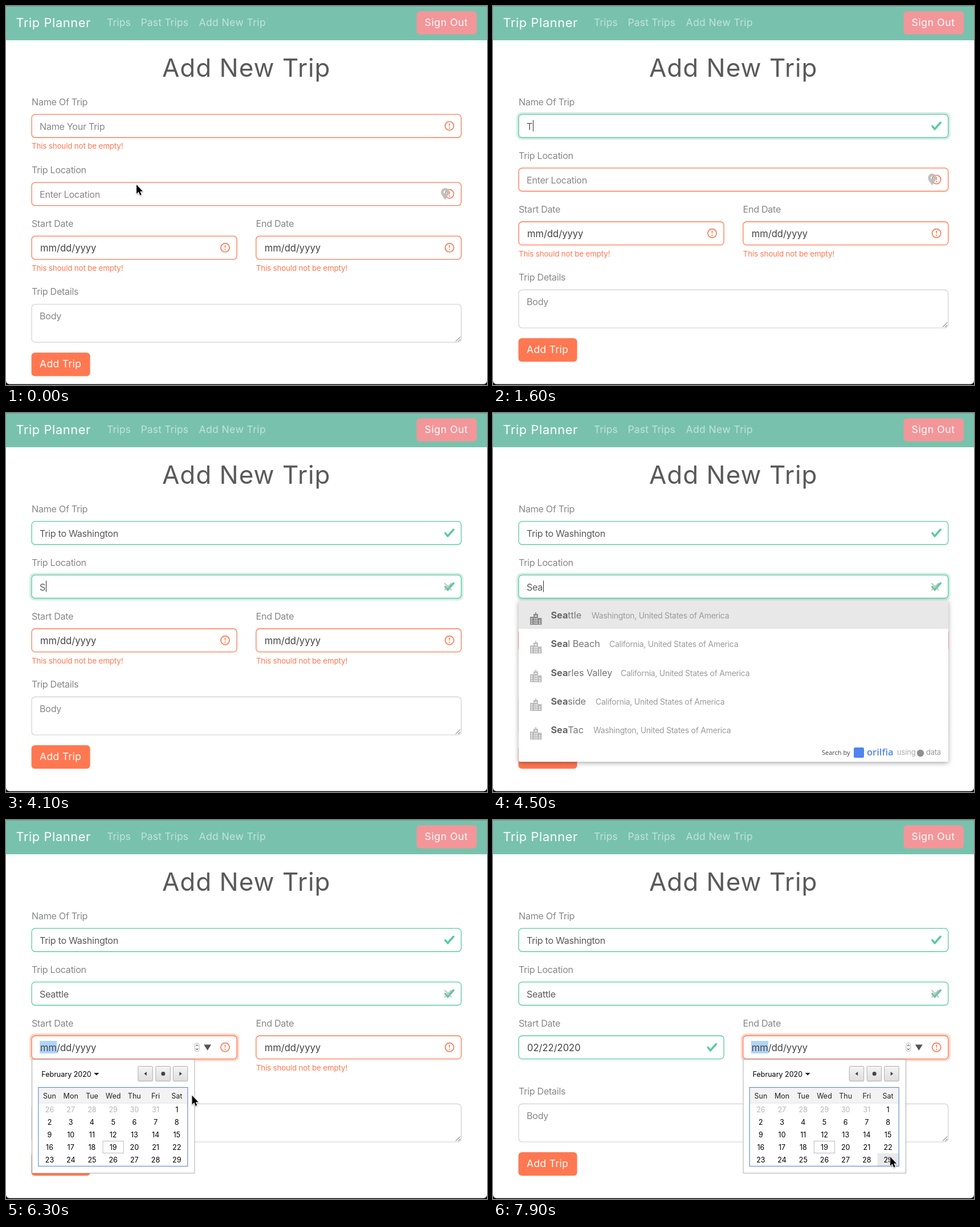
These frames come from a looping animation (844x664 px, 8000 ms). An HTML page with a canvas:

```html
<!DOCTYPE html>
<html lang="en">
<head>
<meta charset="utf-8">
<title>Add New Trip</title>
<style>
html, body { margin: 0; width: 100%; height: 100%; overflow: hidden; background: #fff; }
canvas { display: block; }
</style>
</head>
<body>
<canvas id="stage" width="844" height="664"></canvas>
<script>
const ctx = document.getElementById('stage').getContext('2d');
const LOOP = 8000, TICK = 100;
const GREEN = '#56cc9d', ORANGE = '#ff7851', MINT = '#78c2ad', GREY = '#888', INK = '#5a5a5a';
const UI = 'Inter, sans-serif';
const COL = 393.7;                       // distance between the two date columns

const TRIP = 'Trip to Washington';
const PLACE = 'Seattle';
const range = (a, b) => Array.from({ length: b - a + 1 }, (_, i) => (a + i) * TICK);
const TRIP_KEYS = [...range(16, 22), 2400, 2600, ...range(28, 36)];
const PLACE_KEYS = [4000, 4200, 4400];
const AT = { name: 400, valid: 1600, place: 3700, menu: 4300, pick: 4700, start: 6000, set: 6600, end: 7200 };

const PLACES = [
  ['Seattle', 'Washington', 173], ['Seal Beach', 'California', 204],
  ['Searles Valley', 'California', 224], ['Seaside', 'California', 180],
  ['SeaTac', 'Washington', 176]
];

// Pointer legs: start time, end time, from, to
const LEGS = [
  [0, 400, 229, 313, 216, 210],
  [400, 700, 216, 210, 216, 210],
  [700, 1100, 216, 210, 846, 405],
  [5200, 5600, 766, 584, 308.5, 366.5],
  [5600, 5900, 308.5, 366.5, 351, 395],
  [5900, 6100, 351, 395, 351, 395],
  [6100, 6500, 351, 395, 302, 570],
  [6500, 6600, 302, 570, 302, 570],
  [6600, 7000, 302, 570, 748.5, 404],
  [7000, 7300, 748.5, 404, 748.5, 404],
  [7300, 7900, 748.5, 404, 697, 590],
  [7900, 8000, 697, 590, 697, 590]
];

const clamp = v => Math.max(0, Math.min(1, v));
const ease = p => p * p * (3 - 2 * p);
const count = (keys, t) => keys.filter(k => k <= t).length;

function pointer(t) {
  const leg = LEGS.find(l => t >= l[0] && t < l[1]);
  if (!leg) return null;
  const [a, b, x0, y0, x1, y1] = leg, p = ease((t - a) / (b - a));
  return { x: x0 + (x1 - x0) * p, y: y0 + (y1 - y0) * p, beam: a === 400 };
}

function text(str, x, y, size, color, { ls = 0, weight = 400, font = UI, align = 'left' } = {}) {
  ctx.font = `${weight} ${size}px ${font}`;
  ctx.letterSpacing = ls + 'px';
  ctx.textAlign = align;
  ctx.fillStyle = color;
  ctx.fillText(str, x, y);
  return ctx.measureText(str).width;
}

function rect(x, y, w, h, color) {
  ctx.fillStyle = color;
  ctx.fillRect(x, y, w, h);
}

function round(x, y, w, h, r, fill, stroke, lw = 1) {
  ctx.beginPath();
  ctx.roundRect(x, y, w, h, r);
  if (fill) { ctx.fillStyle = fill; ctx.fill(); }
  if (stroke) { ctx.strokeStyle = stroke; ctx.lineWidth = lw; ctx.stroke(); }
}

function poly(points, fill) {
  ctx.beginPath();
  points.forEach(([x, y]) => ctx.lineTo(x, y));
  ctx.closePath();
  ctx.fillStyle = fill;
  ctx.fill();
}

function disc(x, y, r, fill) {
  ctx.beginPath();
  ctx.arc(x, y, r, 0, 7);
  ctx.fillStyle = fill;
  ctx.fill();
}

function line(points, color, lw) {
  ctx.beginPath();
  points.forEach(([x, y], i) => i % 2 ? ctx.lineTo(x, y) : ctx.moveTo(x, y));
  ctx.strokeStyle = color;
  ctx.lineWidth = lw;
  ctx.stroke();
}

const TICK_MARK = new Path2D('M2.3 6.73L.6 4.53c-.4-1.04.46-1.4 1.1-.8l1.1 1.4 3.4-3.8c.6-.63 1.6-.27 1.2.7l-4 4.6c-.43.5-.8.4-1.1.1z');

function check(x, y) {
  ctx.save();
  ctx.translate(x - 10.1, y - 10.1);
  ctx.scale(2.53, 2.53);
  ctx.fillStyle = GREEN;
  ctx.fill(TICK_MARK);
  ctx.restore();
}

function alert(x, y) {
  ctx.beginPath();
  ctx.arc(x, y, 7.6, 0, 7);
  ctx.strokeStyle = ORANGE;
  ctx.lineWidth = 1.7;
  ctx.stroke();
  poly([[x - 1, y - 4.4], [x + 1, y - 4.4], [x + .5, y + 1.1], [x - .5, y + 1.1]], ORANGE);
  disc(x, y + 3.6, 1.1, ORANGE);
}

function field(x, y, w, ok, glow) {
  if (glow > 0) {
    const rgb = ok ? '120,194,173' : '255,120,81';
    round(x - 4, y - 4, w + 8, 48.6, 9, `rgba(${rgb},${.3 * glow})`);
  }
  round(x, y, w, 40.6, 6, '#fff', ok ? GREEN : ORANGE, 1.3);
  (ok ? check : alert)(x + w - 20.6, y + 20.2);
}

const label = (s, x, y) => text(s, x, y, 16.2, GREY, { ls: -.32 });
const error = (x, y) => text('This should not be empty!', x, y, 13.4, ORANGE, { ls: -.16 });

function entry(value, hint, y, caret) {
  const w = text(value || hint, 59, y, 16.2, value ? INK : GREY, { ls: -.32 });
  if (caret) rect(Math.round(59 + (value ? w + .5 : 0)), y - 17, 1, 20, '#333');
}

function pin(x, y) {
  ctx.beginPath();
  ctx.moveTo(x, y + 10.5);
  ctx.bezierCurveTo(x - 3, y + 5, x - 7.3, y + 1, x - 7.3, y - 3);
  ctx.arc(x, y - 3, 7.3, Math.PI, 0);
  ctx.bezierCurveTo(x + 7.3, y + 1, x + 3, y + 5, x, y + 10.5);
  ctx.moveTo(x + 2.6, y - 3);
  ctx.arc(x, y - 3, 2.6, 0, 7);
  ctx.fillStyle = 'rgba(186,190,188,.95)';
  ctx.fill('evenodd');
}

function building(x, y, color, back) {
  rect(x - 10, y - 3, 6.5, 14, color);
  rect(x - 4, y - 8, 8, 19, color);
  rect(x - .8, y - 11, 1.8, 3, color);
  rect(x + 3.5, y - 1, 7, 12, color);
  for (let i = 0; i < 3; i++) {
    const wy = y - .5 + i * 3.8;
    [-8, -2.4, .9, 6].forEach(dx => { if (dx < 5 || i) rect(x + dx, wy, 1.8, 2, back); });
  }
  rect(x - 2, y - 5, 4, 1.6, back);
}

function menu(typed) {
  ctx.save();
  ctx.shadowColor = 'rgba(0,0,0,.35)';
  ctx.shadowBlur = 8;
  ctx.shadowOffsetY = 2;
  round(45, 328, 754, 283, 2, '#fff');
  ctx.restore();
  rect(45, 328, 754, 50.3, '#e7e8e7');
  PLACES.forEach(([name, state, x], i) => {
    const y = 360 + i * 50.3, n = typed.length;
    building(75, y, i ? '#bdbdbd' : '#8f8f8f', i ? '#fff' : '#e7e8e7');
    const w = text(name.slice(0, n), 101.5, y, 16.4, '#666', { ls: -.12, weight: 700 });
    text(name.slice(n), 101.5 + w, y, 16.4, '#777', { ls: -.12 });
    text(state + ', United States of America', x, y, 14, '#9b9b9b', { ls: -.27 });
  });
  text('Search by', 577, 599, 11, '#444', { font: 'Open Sans, sans-serif' });
  round(633, 586, 18, 18, 2.5, '#4f84f0');
  text('orilfia', 656, 600, 16.5, '#4f84f0', { font: 'Open Sans, sans-serif', weight: 600 });
  text('using', 709, 599, 13, '#aaa', { ls: -.15 });
  disc(750, 596, 6.2, '#8f8f8f');
  text('data', 760, 599, 13, '#999', { ls: -.3 });
}

function dateControls(x, y, clear) {
  if (clear) {
    disc(x + 273, y, 7.6, '#a9a9a9');
    const d = 2.8, cx = x + 273;
    line([[cx - d, y - d], [cx + d, y + d], [cx - d, y + d], [cx + d, y - d]], '#fff', 1.6);
  }
  const s = x + 290;
  round(s - 4, y - 7.5, 8, 15, 4, '#fff', '#bbb', 1);
  [-1, 1].forEach(k => {
    const a = y + k * 2.2, b = y + k * 4.4;
    line([[s - 2, a], [s, b], [s, b], [s + 2, a]], '#555', 1.1);
  });
  poly([[x + 302, y - 4.7], [x + 315, y - 4.7], [x + 308.5, y + 5.6]], '#555');
}

function dateField(x, y, value, glow, hover) {
  const focus = glow > 0, style = { ls: -.05 };
  field(x, y, 360, !!value, glow);
  const shown = value || 'mm/dd/yyyy';
  if (focus) {
    ctx.font = '400 16.6px ' + UI;
    ctx.letterSpacing = '-.05px';
    rect(x + 14, y + 9, ctx.measureText(shown.slice(0, 2)).width + 1.2, 22, '#b1d4fc');
  }
  text(shown, x + 15, y + 26.6, 16.6, '#444', style);
  if (focus || hover) dateControls(x, y + 20.2, !!value);
}

function calendar(x, mouse) {
  ctx.save();
  ctx.shadowColor = 'rgba(0,0,0,.2)';
  ctx.shadowBlur = 2;
  rect(x, 419, 286, 200, '#bcbcbc');
  ctx.restore();
  rect(x + 1, 420, 284, 198, '#fff');
  text('February 2020', x + 17, 449.7, 12.5, '#000');
  poly([[x + 109, 443], [x + 118, 443], [x + 113.5, 447.5]], '#222');
  [186.5, 217.5, 248].forEach((dx, i) => {
    const bx = x + dx, c = bx + 13, k = i - 1;
    const grad = ctx.createLinearGradient(0, 431, 0, 458);
    grad.addColorStop(0, '#f4f4f4');
    grad.addColorStop(1, '#dedede');
    round(bx, 431.5, 25.5, 26, 1.5, grad, '#adadad');
    if (k) poly([[c + k * 2.5, 444.5], [c - k * 2, 441], [c - k * 2, 448]], '#444');
    else disc(c, 444.5, 3.5, '#444');
  });
  const gx = x + 12, cw = 37.2;
  rect(gx, 469, 261.5, 27, '#f3f3f3');
  rect(gx, 495.5, 261.5, 1, '#e2e2e2');
  const mid = { align: 'center' };
  ['Sun', 'Mon', 'Tue', 'Wed', 'Thu', 'Fri', 'Sat'].forEach((d, i) =>
    text(d, gx + 19.2 + i * cw, 487.7, 12.5, '#222', mid));
  for (let i = 0; i < 35; i++) {
    const c = i % 7, r = Math.floor(i / 7), day = i < 6 ? 26 + i : i - 5;
    const cx = gx + .6 + c * cw, cy = 496 + r * 22;
    if (mouse && mouse.x >= cx && mouse.x < cx + cw && mouse.y >= cy && mouse.y < cy + 22) {
      rect(cx, cy, cw, 22, '#e9e9e9');
    }
    if (i === 24) {
      ctx.strokeStyle = '#bbb';
      ctx.lineWidth = 1;
      ctx.strokeRect(cx + .5, cy + .5, cw - 1, 21);
    }
    text(day, cx + cw / 2, cy + 15.7, 12.5, i < 6 ? '#b5b5b5' : '#000', mid);
  }
  ctx.strokeStyle = '#5a86d8';
  ctx.lineWidth = 1.1;
  ctx.strokeRect(gx - .5, 468.5, 262, 138);
}

function drawPointer({ x, y, beam }) {
  ctx.save();
  ctx.translate(x, y);
  if (beam) {
    line([[0, -8], [0, 8], [-3, -9], [3, -9], [-3, 9], [3, 9]], '#222', 1.3);
  } else {
    ctx.beginPath();
    [[0, 0], [0, 16], [3.7, 12.6], [6.2, 18.4], [8.7, 17.3], [6.2, 11.7], [11, 11.7]]
      .forEach(p => ctx.lineTo(...p));
    ctx.closePath();
    ctx.shadowColor = 'rgba(0,0,0,.35)';
    ctx.shadowBlur = 2;
    ctx.shadowOffsetY = 1;
    ctx.strokeStyle = '#fff';
    ctx.lineWidth = 2;
    ctx.lineJoin = 'round';
    ctx.stroke();
    ctx.shadowColor = 'transparent';
    ctx.fillStyle = '#000';
    ctx.fill();
  }
  ctx.restore();
}

function page() {
  rect(0, 0, 844, 664, '#111');
  round(0, 0, 844, 662.4, [0, 0, 6, 6], '#fff');
  rect(0, 0, 844, 60, MINT);
  rect(0, 0, 844, 1, '#64a390');
  text('Trip Planner', 17.5, 37, 21.8, '#fff', { ls: .6 });
  const dim = 'rgba(255,255,255,.55)';
  text('Trips', 177, 35, 17.5, dim, { ls: .15 });
  text('Past Trips', 236.5, 35, 17.5, dim, { ls: .15 });
  text('Add New Trip', 338.5, 35, 17.5, dim, { ls: .4 });
  round(720.5, 9.3, 105.5, 40.4, 6, '#f3969a');
  text('Sign Out', 734.5, 35, 17.5, '#fff', { ls: .65 });
  text('Add New Trip', 274, 124, 44, INK, { ls: 1 });
}

function draw(t) {
  const glow = (from, to) => clamp((t - from + 50) / 150) * (1 - clamp((t - to + 50) / 150)) * (t >= from);
  const resets = [AT.name, ...TRIP_KEYS, AT.place, ...PLACE_KEYS, 4600].filter(r => r <= t);
  const blink = resets.length && Math.floor((t - resets[resets.length - 1]) / 500) % 2 === 0;
  const mouse = pointer(t);
  const trip = TRIP.slice(0, count(TRIP_KEYS, t));
  const place = t >= AT.pick ? PLACE : PLACE.slice(0, count(PLACE_KEYS, t));
  const start = t >= AT.set ? '02/22/2020' : '';
  const over = x => mouse && mouse.x > x && mouse.x < x + 360 && mouse.y > 378 && mouse.y < 419 && t > 5000;

  page();
  label('Name Of Trip', 45, 174);
  field(45.1, 189.9, 753.6, !!trip, glow(AT.name, AT.place));
  entry(trip, 'Name Your Trip', 216.7, blink && t < AT.place);
  if (!trip) error(45, 250.2);

  ctx.save();
  if (t < AT.valid) ctx.translate(0, 25.2);
  label('Trip Location', 45, 268);
  field(45.1, 283.9, 753.6, !!place, glow(AT.place, AT.start));
  entry(place, 'Enter Location', 310.7, blink && t >= AT.place && t < AT.start);
  if (place) {
    line([[769.5, 298], [782, 310.5], [769.5, 310.5], [782, 298]], 'rgba(180,184,182,.85)', 2);
  } else {
    pin(770.5, 304);
  }

  label('Start Date', 45, 362);
  label('End Date', 438.5, 362);
  dateField(45.1, 378, start, glow(AT.start, AT.end), over(45));
  dateField(45.1 + COL, 378, '', glow(AT.end, LOOP + 500), over(439));
  if (!start) error(45, 438.7);
  error(438.7, 438.7);

  label('Trip Details', 45, 481);
  round(45.1, 497.3, 753.6, 66.7, 6, '#fff', '#ced0d2', 1.2);
  label('Body', 59, 524);
  line([[789, 562.5], [797, 554.5], [793.5, 562.5], [797, 559]], '#555', 1);
  round(44.6, 582, 103, 41.3, 6, ORANGE);
  text('Add Trip', 59, 608.2, 17.5, '#fff', { ls: .35 });
  ctx.restore();

  if (t >= AT.menu && t < AT.pick) menu(place);
  if (t > AT.start && t < AT.set) calendar(439 - COL, mouse);
  if (t > AT.end) calendar(438.7, mouse);
  if (mouse) drawPointer(mouse);
}

function loop(now) {
  draw(Math.floor((now % LOOP) / TICK) * TICK);
  requestAnimationFrame(loop);
}
draw(0);
requestAnimationFrame(loop);
</script>
</body>
</html>
```
